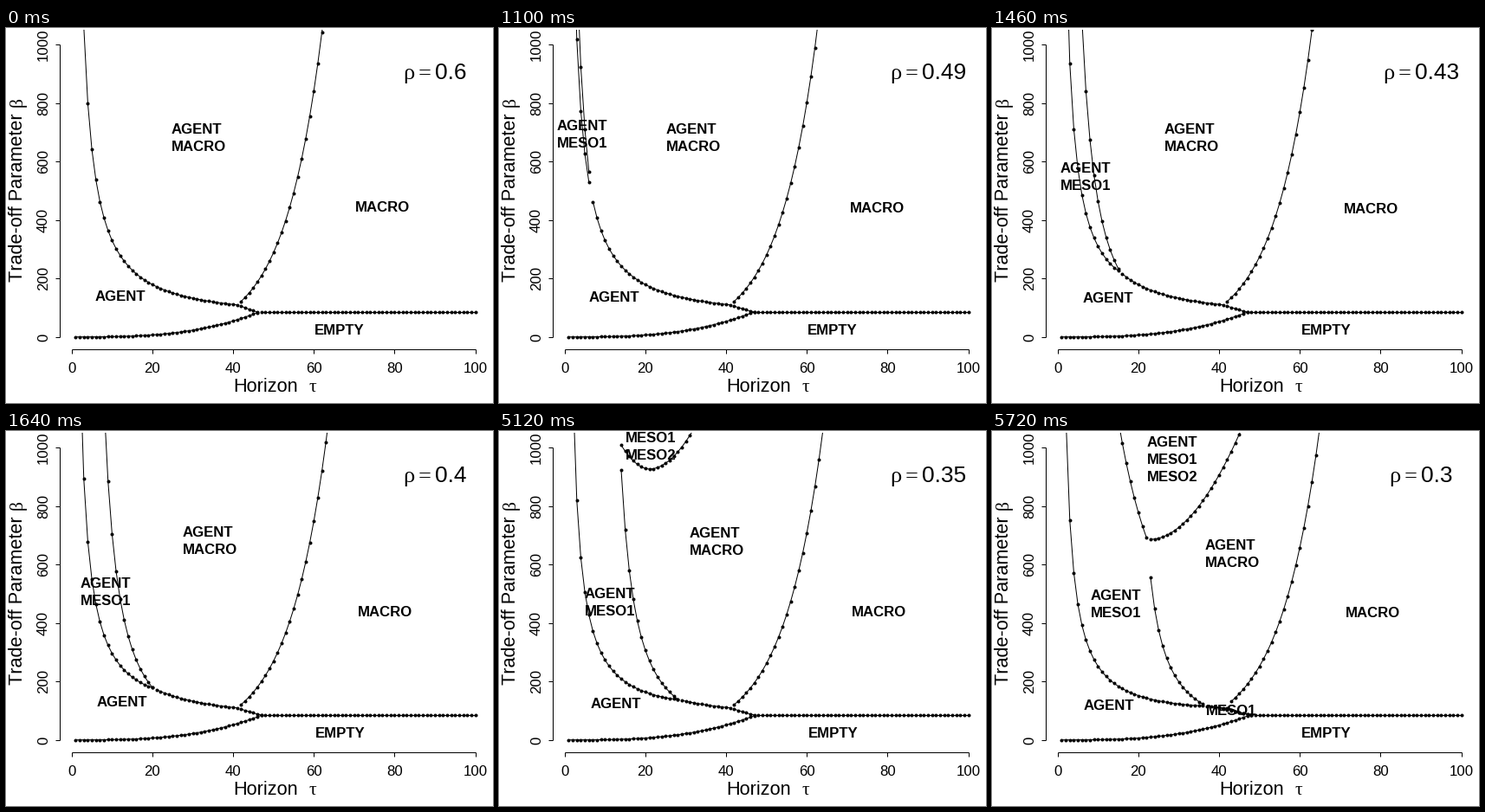
Animation, 562 px wide and 433 px high, one loop 8000 ms. Source, as a matplotlib script:

```python
import numpy as np
import matplotlib.pyplot as plt
from matplotlib.animation import FuncAnimation
from matplotlib.patches import Rectangle

W, H, DPI = 562, 433, 64
TICK_MS, LOOP_MS = 20, 8000
PT = 72 / DPI
SANS, SERIF = "Liberation Sans", "Liberation Serif"
plt.rcParams["text.kerning_factor"] = 6  # plain advances, no kerning

fig = plt.figure(figsize=(W / DPI, H / DPI), dpi=DPI, facecolor="white")
ax = fig.add_axes([0, 0, 1, 1])
ax.set_xlim(0, W)
ax.set_ylim(H, 0)
ax.axis("off")
region = Rectangle((62, 2), 494, 369, transform=ax.transData)


def px(tau):
    return 75.8 + 4.657 * np.asarray(tau, float)


def py(beta):
    return 357 - 0.338 * np.asarray(beta, float)


def write(x, y, s, size, font=SANS, **kw):
    return ax.text(x, y, s, fontsize=size * PT, family=font,
                   rotation_mode="anchor", va="baseline", **kw)


def stroke(xs, ys):
    ax.plot(xs, ys, color="black", lw=PT, solid_capstyle="butt")


# axes
AX_X, AX_Y, TICK = 61.5, 370.5, 5
stroke(px([0, 100]), [AX_Y, AX_Y])
stroke([AX_X, AX_X], py([0, 1000]))
for v in range(0, 101, 20):
    stroke([px(v)] * 2, [AX_Y, AX_Y + TICK])
    write(px(v), 397.5, str(v), 16.8, ha="center")
for v in range(0, 1001, 200):
    stroke([AX_X - TICK, AX_X], [py(v)] * 2)
    write(48, py(v), str(v), 16.8, ha="center", rotation=90)
write(262.5, 420.5, "Horizon", 21.6)
write(349, 420.5, "τ", 21.6, SERIF)
write(18.8, 293, "Trade-off Parameter", 21.6, rotation=90)
write(18.8, 91, "β", 21.6, SERIF, rotation=90)

rho_parts = [write(0, 59, "ρ", 26.4, SERIF), write(0, 59, "=", 26.4, SERIF),
             write(0, 59, "", 26.4)]

# region labels: lines, first visible step, place for progress s in 0..1
LABELS = [
    ("AGENT MACRO", 0, lambda s: (191 + 55 * s ** 3.5, 122 + 15 * s ** 16)),
    ("AGENT", 0, lambda s: (103 + 3 * s, 315 + 7 * s ** 2)),
    ("MACRO", 0, lambda s: (403 + 5 * s, 212 + 3 * s)),
    ("EMPTY", 0, lambda s: (356 + s, 354)),
    ("AGENT MESO1", 10, lambda s: (51 + 31.5 * s + 31.5 * s * s,
                                   195 - 89 * (1.5 * (1 - s)) ** 2.7)),
    ("AGENT MESO1 MESO2", 23, lambda s: (179 - 198 * (1 - s),
                                         18 - 150 * (1 - s))),
    ("MESO1", 29, lambda s: (247, 328)),
]
label_texts = [[write(0, 0, word, 16.8, weight="bold") for word in words.split()]
               for words, _, _ in LABELS]
for text in sum(label_texts, []):
    text.set_clip_path(region)

CURVES = ["empty", "flat", "agent", "agent_low", "meso", "macro",
          "drop", "sliver", "top_left", "top_right"]
curves = {}
for name in CURVES:
    line, = ax.plot([], [], color="black", lw=PT, marker="o",
                    ms=4 * PT, mew=0)
    line.set_clip_path(region)
    curves[name] = line


def taus(a, b):
    return np.arange(a, b + 1, dtype=float)


def agent(t):
    return (3160 + 3.6 * t ** 1.6) / t


def macro(t, u):
    base = 841 * np.exp(0.107 * (t - 60))
    loss = u * (280 + 572 * u + 1757 * u * u)
    return base - loss * (np.maximum(base - 110, 0) / 731) ** 1.15


def boundaries(step):
    """Return {curve: (tau, beta)} for rho = 0.6 - step / 100."""
    u, left = step / 100, 30 - step
    out = {}
    join = 46.4 + 4 * u
    last = round(join)
    late = step >= 29

    t = taus(1, last)
    out["empty"] = t, np.minimum(1 + 85 * (t / join) ** 3, 86)
    t = taus(last + 1, 100)
    out["flat"] = t, np.full(t.size, 86.0)
    start = 43 if late else 42
    t = taus(start, 70)
    out["macro"] = t, macro(t, u)
    t = taus(start, last)
    out["drop"] = t, 86 + 20 * ((last - t) / (last - 42)) ** 1.1
    if late:
        t = taus(39, last)
        out["sliver"] = t, 86 + 28 * (last - t) / (last - 39)

    split = 0
    if step >= 10:
        d = u - 0.2
        meet = 20 + 155.3 * d + 117 * d * d
        sag = 60.3 + 110 * d - 500 * d * d
        pole = 2.25 + 99 * d + 554 * d * d
        power = 1.65 - 2.6 * d - 17 * d * d
        split = int(meet)
        t = taus(1, split)
        out["agent_low"] = t, agent(t) - sag * (meet - t) ** 0.75 / t
        first = max(1, round(23 - 1.8 * left))
        t = taus(first, split)
        out["meso"] = t, agent(meet) * ((meet - pole) / (t - pole)) ** power
    t = taus(split + 1, 42 if late else 41)
    out["agent"] = t, agent(t)

    if step >= 23:
        t = taus(first, 60)
        d = t - (23 - 0.4 * left)
        a = (1.012 + 0.087 * left) * np.where(d < 0, 1.4, 1)
        out["top_right"] = t, 686 + 48 * left + a * np.abs(d) ** 1.9
        t = taus(1, first - 1)
        d = first - 1 - t
        out["top_left"] = t, (692 + 76 * left) * np.exp(0.055 * d + 0.0015 * d * d)
    return out


def step_at(ms):
    if ms < 500:
        return 0
    if ms < 4640:
        return min(20, 1 + (ms - 500) // 60)
    return min(30, 21 + (ms - 4640) // 120)


def draw(frame):
    step = step_at(frame * TICK_MS)
    data = boundaries(step)
    for name, line in curves.items():
        t, b = data.get(name, ([], []))
        line.set_data(px(t), py(b))

    for (_, first, place), texts in zip(LABELS, label_texts):
        x, y = place(step / 30)
        for i, text in enumerate(texts):
            text.set_position((round(x), round(y) + 20 * i))
            text.set_visible(step >= first)

    value = f"{(60 - step) / 100:g}"
    width = 26.4 * (0.556 * (len(value) - 1) + 0.278)
    x0 = 495 - (37 + width) / 2
    for part, dx in zip(rho_parts, (0, 17.5, 37)):
        part.set_x(x0 + dx)
    rho_parts[2].set_text(value)
    return list(curves.values())


anim = FuncAnimation(fig, draw, frames=LOOP_MS // TICK_MS, interval=TICK_MS,
                     init_func=lambda: draw(0), repeat=True, repeat_delay=0)
plt.show()
```
